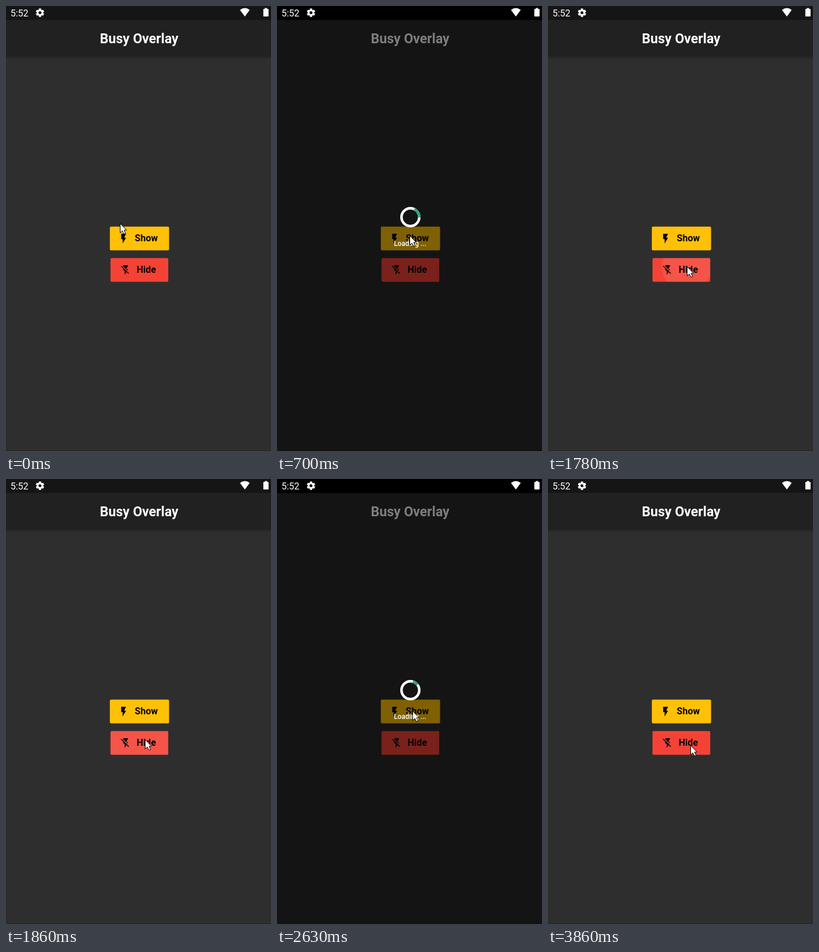
Animation, 456 px wide and 764 px high, one loop 4.64 s. Source, as an HTML page with a canvas:

```html
<!DOCTYPE html>
<html lang="en">
<head>
<meta charset="utf-8">
<title>Busy Overlay</title>
<style>
html, body { margin: 0; width: 100%; height: 100%; overflow: hidden; background: #2e2e2e; }
canvas { display: block; width: 456px; height: 764px; }
</style>
</head>
<body>
<canvas id="stage" width="456" height="764"></canvas>
<script>
const ctx = document.getElementById('stage').getContext('2d');
const LOOP = 4640;
const FONT = 'px Roboto, sans-serif';

// [ms, step]: the picture advances in discrete steps of about 77 ms
const CLOCK = [[0, 0], [450, 6], [700, 9], [1780, 23], [3860, 50], [LOOP, 60]];

// [step, x, y] of the pointer tip
const POINTER = [
  [0, 196, 373], [4, 228, 394], [9, 228, 394], [14, 239, 425], [17, 239, 447],
  [24, 239, 447], [27, 233, 398], [34, 233, 398], [35, 237, 402], [39, 351, 468],
  [41, 332, 480], [46, 245, 457], [60, 245, 457]
];

// Spinner sessions: steps shown and spinner age in ms at the first step
const BUSY = [{ from: 9, to: 22, age: 150 }, { from: 33, to: 48, age: 3 }];
const AGE_PER_STEP = 102.3;

const BOLT = new Path2D('M7 2v11h3v9l7-12h-4l4-8z');
const BOLT_OFF = new Path2D('M3.27 3L2 4.27l5 5V13h3v9l3.58-6.14L17.73 20 19 18.73zM17 10h-4l4-8H7v2.18l8.46 8.46z');
const ARROW = new Path2D('M.5 .5V16.5L4.2 13L7 18.5L9.8 17.5L7.1 11.9H11.5Z');
const WIFI = new Path2D('M402.6 6.8Q411 .4 419.4 6.8L411 18Z');

const SHOW = { x: 178.7, y: 378.7, w: 101.9, h: 40.8, label: 'Show', icon: BOLT, iconX: 192.4, textX: 221.6, on: '#ffc107', dim: '#7f6003' };
const HIDE = { x: 179.8, y: 432.7, w: 99.4, h: 40.8, label: 'Hide', icon: BOLT_OFF, iconX: 196, textX: 224.8, on: '#f44336', dim: '#7a211b' };

const mix = (a, b, p) => a + (b - a) * p;

function sample(keys, at, col) {
  let i = 1;
  while (i < keys.length - 1 && at >= keys[i][0]) i++;
  const a = keys[i - 1], b = keys[i];
  return mix(a[col], b[col], (at - a[0]) / (b[0] - a[0]));
}

// cubic-bezier(.4, 0, .2, 1)
function ease(x) {
  if (x <= 0) return 0;
  if (x >= 1) return 1;
  let lo = 0, hi = 1, s;
  for (let i = 0; i < 24; i++) {
    s = (lo + hi) / 2;
    const bx = 1.2 * s * (1 - s) ** 2 + 0.6 * s * s * (1 - s) + s ** 3;
    if (bx < x) lo = s; else hi = s;
  }
  return 3 * s * s * (1 - s) + s ** 3;
}

function rect(x, y, w, h, color) {
  ctx.fillStyle = color;
  ctx.fillRect(x, y, w, h);
}

function text(str, x, y, size, weight, color, align = 'left') {
  ctx.font = weight + ' ' + size + FONT;
  ctx.textAlign = align;
  ctx.fillStyle = color;
  ctx.fillText(str, x, y);
}

function drawGear(x, y) {
  ctx.save();
  ctx.translate(x, y);
  ctx.fillStyle = ctx.strokeStyle = '#fff';
  for (let i = 0; i < 6; i++) {
    ctx.fillRect(-2, -7.2, 4, 3.5);
    ctx.rotate(Math.PI / 3);
  }
  ctx.lineWidth = 3;
  ctx.beginPath();
  ctx.arc(0, 0, 4, 0, 7);
  ctx.stroke();
  ctx.restore();
}

function drawScreen(busy) {
  rect(0, 0, 456, 764, busy ? '#141414' : '#2e2e2e');
  if (!busy) {
    const shade = ctx.createLinearGradient(0, 86, 0, 92);
    shade.addColorStop(0, '#222');
    shade.addColorStop(1, '#2e2e2e');
    rect(0, 86, 456, 6, shade);
    rect(0, 24, 456, 62, '#212121');
  }
  rect(0, 0, 456, 24, busy ? '#000' : '#151515');
  rect(0, 763, 456, 1, busy ? '#100e0f' : '#262324');
  text('5:52', 7.7, 17.5, 16, 400, '#fff');
  drawGear(58.5, 11.5);
  ctx.fillStyle = '#fff';
  ctx.fill(WIFI);
  ctx.beginPath();
  ctx.roundRect(442.8, 5, 9, 13, 1);
  ctx.rect(445.4, 3.6, 3.8, 2);
  ctx.fill();
  text('Busy Overlay', 229.1, 64, 23.1, 700, busy ? '#7d7d7d' : '#fff', 'center');
}

function drawButton(b, busy, ripple) {
  ctx.save();
  ctx.beginPath();
  ctx.roundRect(b.x, b.y, b.w, b.h, 2);
  ctx.fillStyle = busy ? b.dim : b.on;
  ctx.fill();
  if (ripple) {
    ctx.clip();
    ctx.beginPath();
    ctx.arc(ripple.x, ripple.y, ripple.r, 0, 7);
    ctx.fillStyle = 'rgba(255,255,255,' + ripple.alpha + ')';
    ctx.fill();
  }
  ctx.restore();
  ctx.save();
  ctx.translate(b.iconX, b.y + 10.7);
  ctx.scale(0.833, 0.833);
  ctx.fillStyle = '#000';
  ctx.fill(b.icon);
  ctx.restore();
  text(b.label, b.textX, b.y + 25.7, 16, 700, '#000');
}

function ring(start, sweep, color, cap) {
  ctx.lineWidth = 4.4;
  ctx.lineCap = cap;
  ctx.strokeStyle = color;
  ctx.beginPath();
  ctx.arc(229.5, 362.6, 15.3, start, start + sweep);
  ctx.stroke();
}

function drawSpinner(age) {
  const turn = Math.PI * 2;
  const cycle = age / 1333 % 1;
  const head = ease(cycle * 2), tail = ease(cycle * 2 - 1);
  const start = turn * (-0.25 + 0.75 * tail + age / 2222 + 0.25 * cycle);
  const sweep = Math.max(0.75 * turn * (head - tail), 0.001);
  const p = Math.min(1, age / 600);
  const color = `rgb(${mix(46, 30, p)},${mix(164, 178, p)},${mix(100, 220, p)})`;
  ring(0, turn, '#fff', 'butt');
  ring(start, sweep, color, 'square');
  text('Loading ...', 229, 412.3, 11.9, 500, '#fff', 'center');
}

function drawPointer(x, y) {
  ctx.save();
  ctx.translate(x, y);
  ctx.fillStyle = '#fff';
  ctx.fill(ARROW);
  ctx.lineWidth = 1;
  ctx.lineCap = 'butt';
  ctx.strokeStyle = '#000';
  ctx.stroke(ARROW);
  ctx.restore();
}

function showRipple(step) {
  return step === 6 || step === 29 ? { r: 12, alpha: 0.1 } : null;
}

function hideRipple(step) {
  if (step === 23 || step === 49) return { r: 43, alpha: 0.09 };
  if (step === 24) return { r: 90, alpha: 0.09 };
  if (step === 25) return { r: 90, alpha: 0.04 };
  return null;
}

function draw(ms) {
  const step = Math.floor(sample(CLOCK, ms, 1) + 0.06);
  const busy = BUSY.find(b => step >= b.from && step <= b.to);
  const x = Math.round(sample(POINTER, step, 1));
  const y = Math.round(sample(POINTER, step, 2));
  const at = ripple => ripple && { x, y, ...ripple };
  drawScreen(busy);
  drawButton(SHOW, busy, at(showRipple(step)));
  drawButton(HIDE, busy, at(hideRipple(step)));
  if (busy) drawSpinner(busy.age + (step - busy.from) * AGE_PER_STEP);
  drawPointer(x, y);
}

const began = performance.now();
function tick() {
  draw((performance.now() - began) % LOOP);
  requestAnimationFrame(tick);
}
tick();
</script>
</body>
</html>
```
